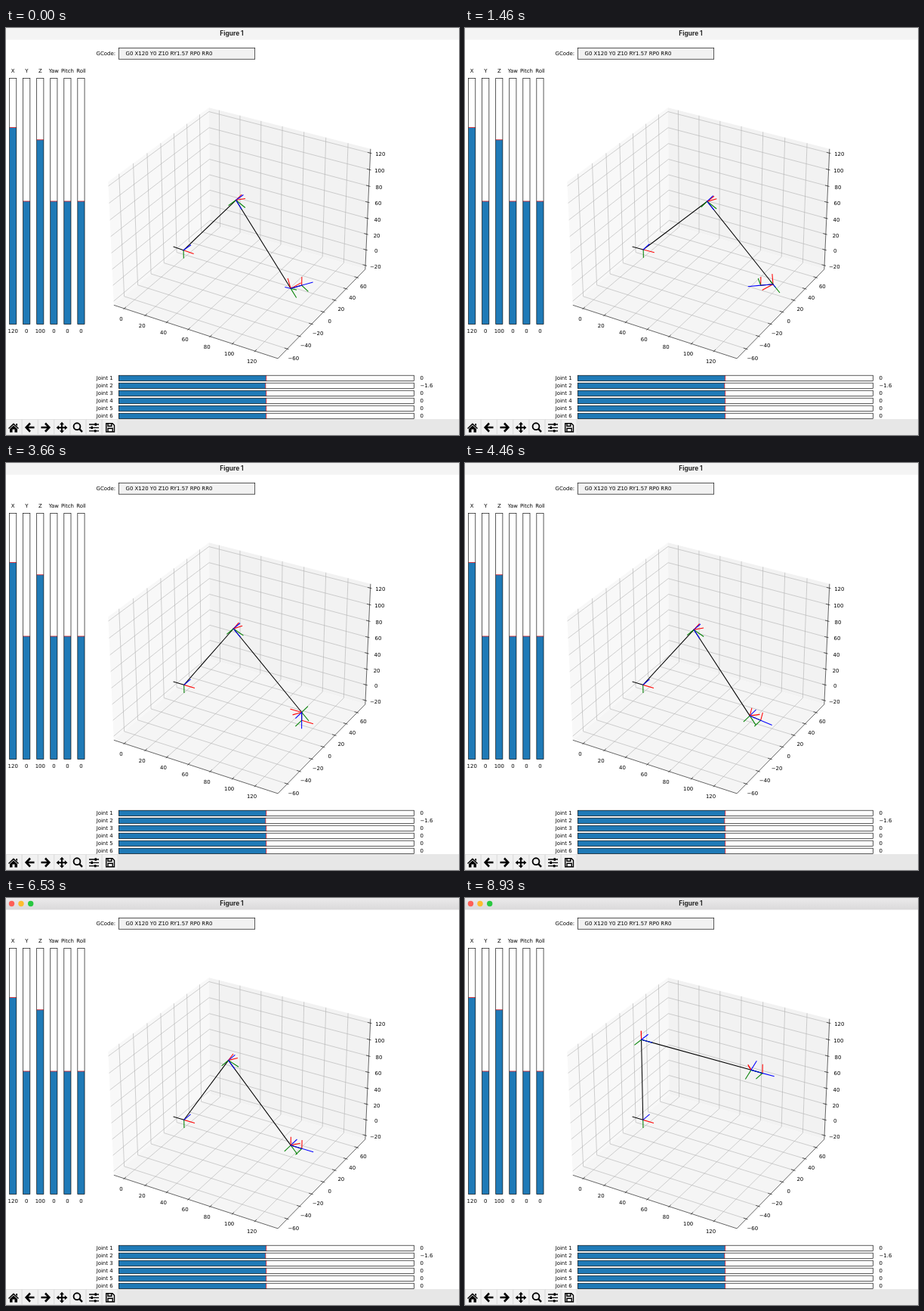
An HTML page that plays this animation: 600 px wide and 538 px high, repeating every 9 s.

```html
<!DOCTYPE html>
<html lang="en">
<head>
<meta charset="utf-8">
<title>Figure 1</title>
<style>
  html, body { margin: 0; width: 100%; height: 100%; overflow: hidden; background: #fff; }
  svg { display: block; width: 600px; height: 538px; }
  text { font: 6.95px "DejaVu Sans", sans-serif; fill: #000; }
  .title { font: 700 8.4px Inter, sans-serif; fill: #262626; }
  .icon { fill: none; stroke: #000; stroke-width: 1.9; }
  .solid { fill: #000; stroke: none; }
</style>
</head>
<body>
<svg id="stage" viewBox="0 0 600 538">
  <defs>
    <linearGradient id="bar" x2="0" y2="1">
      <stop stop-color="#ebeaeb"/><stop offset="1" stop-color="#dad9da"/>
    </linearGradient>
  </defs>
  <rect id="titlebar" width="600" height="15.5"/>
  <g id="lights">
    <circle cx="7.5" cy="7.5" r="3.7" fill="#fe5f57"/>
    <circle cx="20" cy="7.5" r="3.7" fill="#febc2e"/>
    <circle cx="32.7" cy="7.5" r="3.7" fill="#28c840"/>
  </g>
  <text class="title" x="299" y="10.2" text-anchor="middle">Figure 1</text>
  <g id="plot"></g>
  <g id="arm" fill="none" stroke-width="1.05" stroke-linecap="square"></g>
  <g id="panel"></g>
  <rect y="517" width="600" height="21" fill="#e7e7e7"/>
  <g id="buttons" fill="#f1f1f1" stroke="#dadada" stroke-width="0.5"></g>
  <g id="icons">
    <path class="solid" d="M3 529 10 522.3 17 529 16 530 10 524.4 4 530ZM5 530 10 525.4 15 530V534.5H11.5V530.5H8.5V534.5H5ZM13.3 523H15V526.3L13.3 524.7Z"/>
    <path class="icon" stroke-width="3" style="stroke-width:2.6" d="M32 522.5 26.7 528 32 533.5M27 528H37.5"/>
    <path class="icon" style="stroke-width:2.6" d="M52 522.5 57.3 528 52 533.5M57 528H46.5"/>
    <path class="icon" d="M74 523V533.5M68.5 528.2H79.5"/>
    <path class="solid" d="M74 520.8 77 524.3H71ZM74 535.6 77 532.1H71ZM66.6 528.2 70.1 525.2V531.2ZM81.4 528.2 77.9 525.2V531.2Z"/>
    <circle class="icon" cx="94" cy="526.7" r="4.4"/>
    <path class="icon" style="stroke-width:2.4" d="M97.3 530 101 533.8"/>
    <path class="icon" style="stroke-width:1.3" d="M110 524H123M110 528.3H123M110 532.6H123"/>
    <path class="solid" d="M117.5 522.3H120V525.7H117.5ZM112.5 526.6H115V530H112.5ZM117 530.9H119.5V534.3H117Z"/>
    <path class="icon" style="stroke-width:1.4" d="M132.7 522.7H141L143.5 525.2V533.7H132.7ZM135 533V529.3H141.2V533M135 523V526.2H139.8V523"/>
  </g>
</svg>
<script>
const LOOP = 9000, STEP = LOOP / 135;
const byId = id => document.getElementById(id);

function add(parent, tag, attrs, text) {
  const el = document.createElementNS('http://www.w3.org/2000/svg', tag);
  for (const key in attrs) el.setAttribute(key, attrs[key]);
  if (text !== undefined) el.textContent = text;
  parent.appendChild(el);
  return el;
}

// Vectors
const plus = (a, b, k = 1) => a.map((v, i) => v + k * b[i]);
const cross = (a, b) => [a[1] * b[2] - a[2] * b[1], a[2] * b[0] - a[0] * b[2], a[0] * b[1] - a[1] * b[0]];
const scale = (a, k) => a.map(v => v * k);

// Perspective camera: elevation 30, azimuth -60, box aspect about 4:4:3
const MIN = [-10, -75, -25], MAX = [140, 75, 125];
function project([px, py, pz]) {
  const x = (px - 65) * 1.1428 / 150, y = py * 1.1428 / 150, z = (pz - 50) * 0.8535 / 150;
  const k = 2178 / (10 - (0.433 * x - 0.75 * y + 0.5 * z));
  return [312.3 + k * (0.866 * x + 0.5 * y), 263.4 - k * (-0.25 * x + 0.433 * y + 0.866 * z)];
}
const path = pts => 'M' + pts.map(p => project(p).map(v => v.toFixed(2)).join(' ')).join('L');

function drawPlot() {
  const g = byId('plot'), [x0, y0, z0] = MIN, [x1, y1, z1] = MAX;
  const pane = (pts, fill) => add(g, 'path', { d: path(pts) + 'Z', fill });
  const line = (pts, stroke) => add(g, 'path', { d: path(pts), fill: 'none', stroke, 'stroke-width': 0.6 });
  const grid = pts => line(pts, '#b0b0b0');
  const range = (a, b) => Array.from({ length: (b - a) / 20 + 1 }, (_, i) => a + 20 * i);
  const xs = range(0, 120), ys = range(-60, 60), zs = range(-20, 120);
  const label = (value, point, dx, dy) => {
    const [x, y] = project(point);
    add(g, 'text', { x: x + dx, y: y + dy + 2.6, 'text-anchor': 'middle' }, String(value).replace('-', '−'));
  };

  pane([[x0, y0, z0], [x0, y1, z0], [x0, y1, z1], [x0, y0, z1]], '#f8f8f8');
  pane([[x0, y1, z0], [x1, y1, z0], [x1, y1, z1], [x0, y1, z1]], '#f2f2f2');
  pane([[x0, y0, z0], [x1, y0, z0], [x1, y1, z0], [x0, y1, z0]], '#f5f5f5');
  xs.forEach(x => grid([[x, y0, z0], [x, y1, z0], [x, y1, z1]]));
  ys.forEach(y => grid([[x1, y, z0], [x0, y, z0], [x0, y, z1]]));
  zs.forEach(z => grid([[x0, y0, z], [x0, y1, z], [x1, y1, z]]));

  line([[x0, y0, z0], [x1, y0, z0], [x1, y1, z0], [x1, y1, z1]], '#000');
  xs.forEach(x => {
    line([[x, y0 - 1.3, z0], [x, y0 + 2.5, z0]], '#000');
    label(x, [x, y0, z0], -4.3, 13.4);
  });
  ys.forEach(y => {
    line([[x1 + 1.3, y, z0], [x1 - 2.5, y, z0]], '#000');
    label(y, [x1, y, z0], 8.2, 11.8);
  });
  zs.forEach(z => {
    line([[x1 + 1.3, y1, z], [x1 - 2.5, y1, z]], '#000');
    label(z, [x1, y1, z], 13.2, 1.5);
  });
}

function drawPanel() {
  const g = byId('panel');
  const box = (x, y, width, height, fill, stroke = '#000') =>
    add(g, 'rect', { x, y, width, height, fill, stroke, 'stroke-width': 0.65 });
  const text = (x, y, str, anchor = 'middle') => add(g, 'text', { x, y, 'text-anchor': anchor }, str);
  const red = d => add(g, 'path', { d, stroke: '#f00', 'stroke-width': 0.7 });
  const BLUE = '#1f7ab7';

  text(145, 36, 'GCode:', 'end');
  box(149.3, 26.3, 180.4, 14.9, '#f2f2f2');
  text(158.6, 36, 'G0 X120 Y0 Z10 RY1.57 RP0 RR0', 'start');

  [['X', 120], ['Y', 0], ['Z', 100], ['Yaw', 0], ['Pitch', 0], ['Roll', 0]].forEach(([name, value], i) => {
    const x = 4.6 + 18.05 * i, top = 229 - value * 325 / 400;
    box(x, top, 9.2, 391.5 - top, BLUE, 'none');
    red(`M${x} ${top}h9.2`);
    box(x, 66.5, 9.2, 325, 'none');
    text(x + 4.6, 58.8, name);
    text(x + 4.6, 403.3, value);
  });

  [0, -1.6, 0, 0, 0, 0].forEach((value, i) => {
    const y = 459.2 + 10 * i, end = 344.7 + value * 0.54;
    box(149.3, y, end - 149.3, 7.4, BLUE, 'none');
    red(`M${end} ${y}v7.4`);
    box(149.3, y, 391.2, 7.4, 'none');
    text(141.6, y + 6.2, `Joint ${i + 1}`, 'end');
    text(548.5, y + 6.2, String(value).replace('-', '−'), 'start');
  });
}

function drawButtons() {
  for (let i = 0; i < 7; i++)
    add(byId('buttons'), 'rect', { x: 0.4 + 21.2 * i, y: 517.4, width: 20.4, height: 20.2 });
}

// Yaw turn, then a pitch swing down and up, then a lift
function pose(ms) {
  const rad = Math.PI / 180, clamp = v => Math.min(1, Math.max(0, v));
  const yaw = Math.min(360, 58 + 0.11 * ms) * rad;
  const s = 4 * clamp((ms - 2760) / 3600);
  const pitch = 90 * rad * (s < 1 ? -s : s < 3 ? s - 2 : 4 - s);
  return {
    tip: [120, 0, 100 * clamp((ms - 6370) / 1940)],
    tool: [Math.cos(yaw) * Math.cos(pitch), Math.sin(yaw) * Math.cos(pitch), Math.sin(pitch)],
    up: [-Math.sin(pitch) * Math.cos(yaw), -Math.sin(pitch) * Math.sin(yaw), Math.cos(pitch)]
  };
}

// Inverse kinematics: base offset 10, links of 100, tool of 10
function solve({ tip, tool, up }) {
  const wrist = plus(tip, tool, -10);
  const turn = Math.atan2(wrist[1], wrist[0]);
  const out = [Math.cos(turn), Math.sin(turn), 0], side = [-out[1], out[0], 0];
  const reach = Math.hypot(wrist[0], wrist[1]) - 10;
  const lift = Math.atan2(wrist[2], reach) + Math.acos(Math.hypot(reach, wrist[2]) / 200);
  const base = scale(out, 10);
  const upper = plus(scale(out, Math.cos(lift)), [0, 0, Math.sin(lift)]);
  const elbow = plus(base, upper, 100);
  const fore = scale(plus(wrist, elbow, -1), 0.01);

  let hinge = cross(tool, fore);
  const size = Math.hypot(...hinge);
  // A straight wrist leaves the roll free; it settles at half a radian
  hinge = size > 1e-4 ? scale(hinge, 1 / size) : plus(scale(side, Math.cos(0.5)), [0, 0, Math.sin(0.5)]);

  const frame = (at, x, z) => ({ at, axes: [x, cross(z, x), z] });
  return {
    joints: [[0, 0, 0], base, elbow, wrist, tip],
    frames: [
      frame(base, out, side),
      frame(elbow, upper, side),
      frame(elbow, cross(fore, side), fore),
      frame(wrist, cross(fore, hinge), hinge),
      frame(wrist, cross(tool, hinge), tool),
      frame(tip, up, tool)
    ]
  };
}

drawPlot();
drawPanel();
drawButtons();

const arm = byId('arm');
const links = add(arm, 'path', { stroke: '#000', 'stroke-linejoin': 'round' });
const axisPaths = Array.from({ length: 18 }, (_, i) =>
  add(arm, 'path', { stroke: ['#f00', '#008000', '#00f'][i % 3] }));

function render(time) {
  const ms = Math.floor((time % LOOP + 7) / STEP) * STEP % LOOP;
  const { joints, frames } = solve(pose(ms));
  links.setAttribute('d', path(joints));
  axisPaths.forEach((el, i) => {
    const { at, axes } = frames[Math.floor(i / 3)];
    el.setAttribute('d', path([at, plus(at, axes[i % 3], 10)]));
  });
  const active = ms > 6060;
  byId('lights').setAttribute('visibility', active ? 'visible' : 'hidden');
  byId('titlebar').setAttribute('fill', active ? 'url(#bar)' : '#f4f4f4');
}

const start = performance.now();
function tick() {
  render(performance.now() - start);
  requestAnimationFrame(tick);
}
tick();
</script>
</body>
</html>
```
